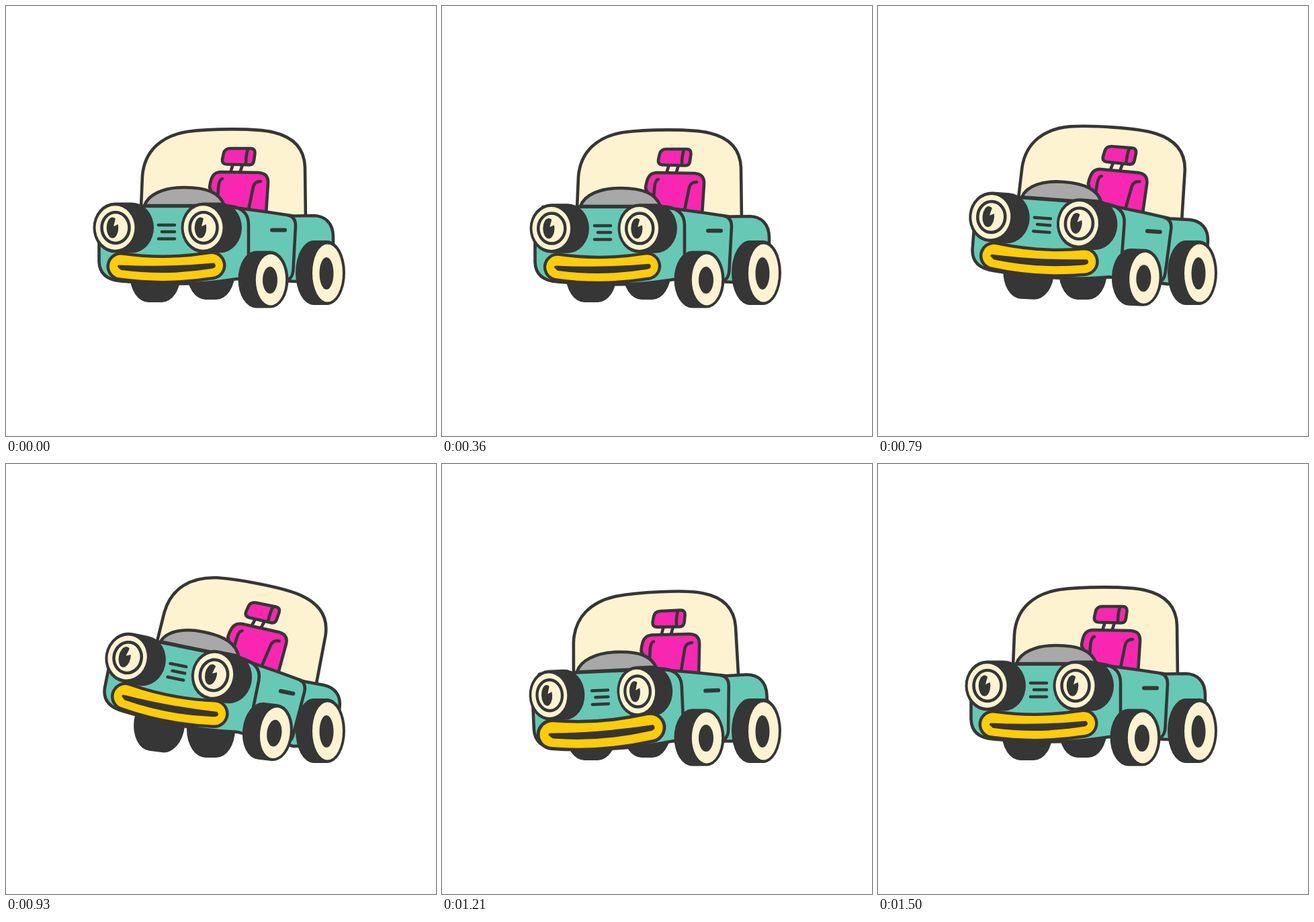
These frames come from a looping animation (640 by 640 pixels, 2070 ms). An HTML page:

```html
<!DOCTYPE html>
<html lang="en">
<head>
<meta charset="utf-8">
<title>Bouncing car</title>
<style>
  html, body { margin: 0; height: 100%; overflow: hidden; background: #fff; }
  svg { display: block; width: 100vw; height: 100vh; }
  .line { fill: none; stroke: #363636; stroke-width: 4.6; stroke-linecap: round; stroke-linejoin: round; }
  .dark { fill: #363636; }
  .cream { fill: #fdf3d1; }
  .teal { fill: #66c9b5; }
  .pink { fill: #f926b1; }
  .grey { fill: #a8a8a8; }
  .handle { stroke-width: 6; }
  .lips { stroke-width: 43; }
  .lips.inner { stroke: #ffcc05; stroke-width: 34; }
</style>
</head>
<body>
<svg viewBox="0 0 640 640">
  <defs>
    <path id="smile" d="M171 387.500Q238 397 306 386"/>
    <g id="lamp">
      <rect class="dark" x="129.500" y="292.500" width="90.500" height="75" rx="33" ry="37.500"/>
      <ellipse class="cream" cx="162.500" cy="330" rx="29" ry="32.700"/>
      <ellipse class="line" cx="163" cy="330" rx="20.500" ry="23"/>
      <ellipse class="dark" cx="158.500" cy="330" rx="8.800" ry="15.500"/>
      <path class="cream" d="M160 328L164 313L171 323Z"/>
    </g>
  </defs>

  <g id="farWheel"><rect class="dark" x="184" y="356" width="76" height="85" rx="28" ry="42"/></g>
  <rect class="dark" x="269" y="352" width="72" height="85" rx="28" ry="42"/>

  <g id="body">
    <g class="line">
      <path class="cream" d="M201 300L203 253C206 215 232 193 270 187C300 183 370 181 398 188C428 195 444 212 445 240L446 318Z"/>
      <path d="M338 235L334 248M352 236L348 249"/>
      <path class="pink" d="M334 212H364Q371 212 370.500 219L369 230Q368 237 361 236.500L328 235.500Q321 235 322 228L324 219Q326 212 334 212Z"/>
      <path d="M360 213Q357 222 357 236"/>
      <path class="pink" d="M303 270C305 254 309 247.500 320 247L376 248Q391 249 390 264L387 310L320 310Z"/>
      <path d="M322 257Q317 258 316 272L315 285M379 261Q370 261 368 269L361 303"/>
      <path class="teal" d="M150 298H325L388 306.500L428 312.500L458 312C475 312.500 487 323 487 344V395L432 410L345 406L320 409.500C270 416 210 413 172 409.500C150 408 139 398 138.500 380V340Z"/>
      <path class="grey" d="M206 297C212 280 235 270 265 270C300 270 318 278 325 297Z"/>
      <path d="M325 297Q361 298 361 325V374M420 311.500Q431 314 431 327L427.500 392Q427 402 422 406"/>
      <path d="M227 326H251M232 336H251M227 346.500H251"/>
      <path class="handle" d="M396 333.500H415"/>
    </g>
    <g id="leftLamp"><use href="#lamp"/></g>
    <g id="rightLamp"><use href="#lamp" x="131"/></g>
    <g id="mouth" class="line">
      <use class="lips" href="#smile"/>
      <use class="lips inner" href="#smile"/>
      <path class="dark" stroke-width="4" d="M168 387.500Q238 391 309 384.500Q312 388 305 389Q238 400 172 391Z"/>
    </g>
  </g>

  <g id="nearWheel">
    <rect class="dark" x="345.500" y="364.500" width="75" height="85" rx="27" ry="42.500"/>
    <ellipse class="cream" cx="394" cy="407.500" rx="22.200" ry="38"/>
    <ellipse class="dark" cx="393" cy="408" rx="11" ry="20"/>
  </g>
  <rect class="dark" x="431" y="349" width="74" height="96" rx="27" ry="48"/>
  <ellipse class="cream" cx="478.500" cy="397.500" rx="22.500" ry="43"/>
  <ellipse class="dark" cx="477" cy="398" rx="10.500" ry="24"/>
</svg>

<script>
  const LOOP = 2070, FPS = 14;
  // Body tilt in degrees, one pose per step, from the start of the leap
  const LEAP_START = 9, PEAK = 10.9;
  const tilts = [0, 1, 4.3, 8.5, 11.5, 12.3, 10.9, 4.6, -2.5, -2.9, -1.6, -0.6];

  const place = (id, transform) =>
    document.getElementById(id).setAttribute("transform", transform);
  const scaleAt = (x, y, sx, sy = sx) =>
    `translate(${x} ${y}) scale(${sx} ${sy}) translate(${-x} ${-y})`;

  function draw(now) {
    const step = Math.floor((now % LOOP + 5) * FPS / 1000);
    const idling = step <= LEAP_START;
    const tilt = tilts[step - LEAP_START] || 0;
    const lift = Math.max(0, tilt) / PEAK;
    const dip = Math.max(0, -tilt);
    const bob = idling ? 3 * Math.abs(Math.sin(Math.PI * step / 4.5)) : 0;

    place("body", `translate(${-0.4 * dip} ${bob + 1.9 * dip}) rotate(${tilt} 380 399)`);
    place("farWheel", `translate(${6 * lift} ${-12 * lift}) rotate(${7 * lift} 222 399)`);
    place("nearWheel", `translate(${6 * lift} ${-7 * lift}) rotate(${6 * lift} 393 408)`);

    const lampY = 1 - 0.022 * bob, lampX = lampY - 0.034 * dip;
    place("leftLamp", scaleAt(175, 330, lampX, lampY));
    place("rightLamp", scaleAt(306, 330, lampX, lampY));

    const smile = 1 + (idling ? 0.0022 * step - 0.025 * bob : 0.034 * dip);
    place("mouth", `rotate(${-0.4 * dip} 238 390) ${scaleAt(238, 390, smile)}`);
  }

  function tick() {
    draw(performance.now());
    requestAnimationFrame(tick);
  }
  tick();
</script>
</body>
</html>
```
